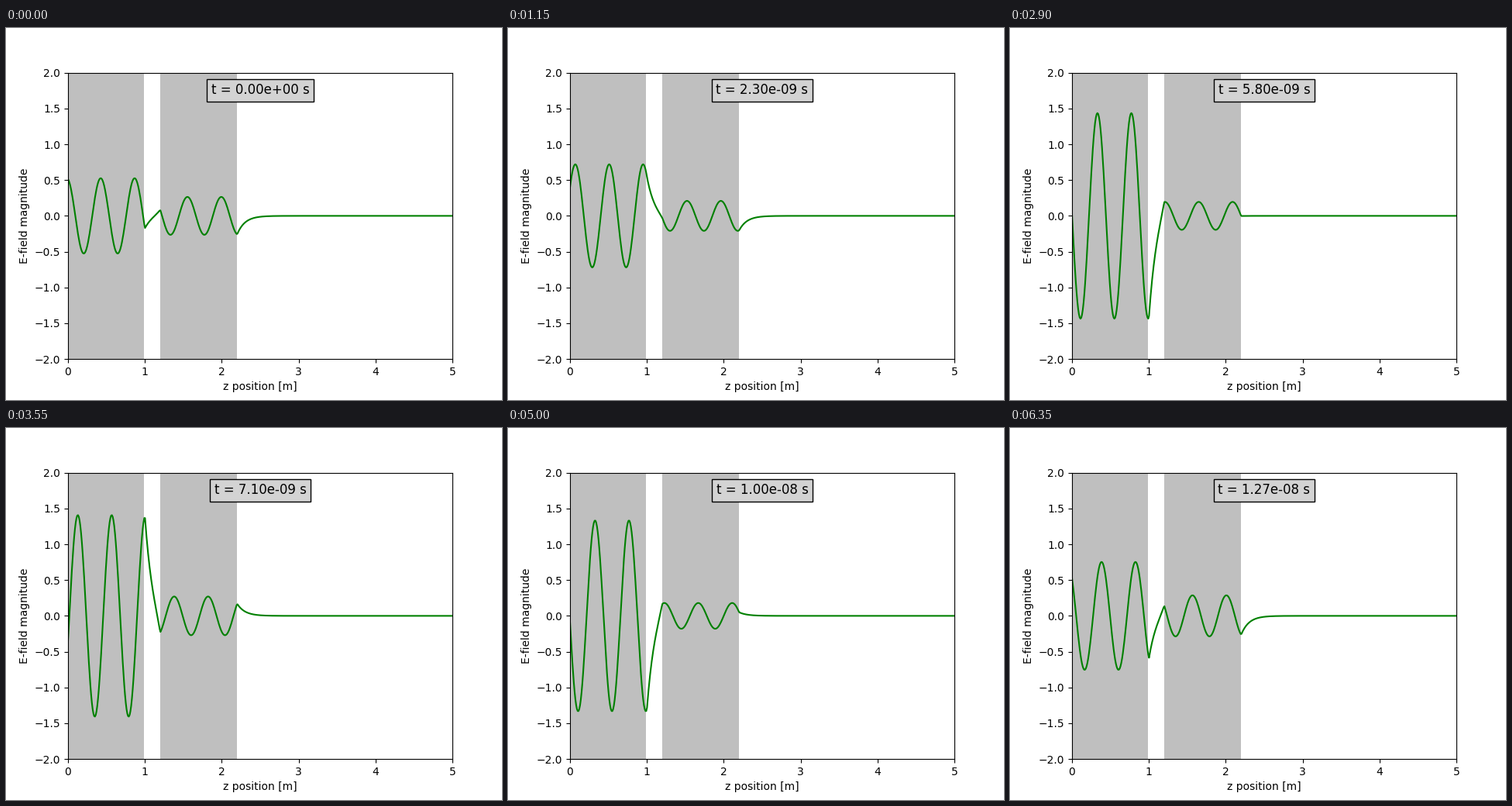
A matplotlib script that plays this animation: 640 px wide and 480 px high, repeating every 6400 ms.

```python
import numpy as np
import matplotlib.pyplot as plt
from matplotlib.animation import FuncAnimation

FRAMES, INTERVAL = 128, 50
DT = 1e-10                          # simulated seconds per frame
OMEGA = 2 * np.pi * 3e8 / 0.64      # angular frequency [rad/s]
K = 14.253                          # z wavenumber inside the slabs [1/m]
KAPPA = 10.0                        # evanescent decay constant [1/m]
Z1, Z2, Z3 = 1.0, 1.2, 2.2          # interfaces: slab | gap | slab | air

z = np.linspace(0, 5, 500)
slab1 = z < Z1
slab2 = (z >= Z2) & (z <= Z3)


def first_slab(z, phase):
    """Incident wave plus its reflection at Z1."""
    return np.cos(K * z - phase) + 0.5 * np.cos(K * (z - 2 * Z1) + phase)


def second_slab(z, phase):
    """Two counter-propagating waves of unequal strength."""
    u, p = K * (z - 1.579), phase + 0.571
    return 0.2345 * np.cos(u + p) + 0.0595 * np.cos(u - p)


def gap(z, left, right):
    """Evanescent field joining the values at both gap edges."""
    return (left * np.sinh(KAPPA * (Z2 - z))
            + right * np.sinh(KAPPA * (z - Z1))) / np.sinh(KAPPA * (Z2 - Z1))


def field(t):
    phase = OMEGA * t
    left = first_slab(Z1, phase)
    right = second_slab(Z2, phase)
    tail = second_slab(Z3, phase) * np.exp(-KAPPA * (z - Z3))
    return np.select(
        [slab1, z < Z2, slab2],
        [first_slab(z, phase), gap(z, left, right), second_slab(z, phase)],
        tail)


fig, ax = plt.subplots(figsize=(6.4, 4.8), dpi=100)
ax.set_xlim(0, 5)
ax.set_ylim(-2, 2)
ax.set_xlabel("z position [m]")
ax.set_ylabel("E-field magnitude")
for region in (slab1, slab2):
    ax.fill_between(z, -2, 2, where=region, color="gray", alpha=0.5,
                    linewidth=0)

line, = ax.plot(z, field(0), color="green", lw=1.5)
label = ax.text(2.5, 1.7, "", fontsize=12, ha="center",
                bbox={"facecolor": "lightgray"})


def update(i):
    t = i * DT
    line.set_ydata(field(t))
    label.set_text(f"t = {t:.2e} s")
    return line, label


anim = FuncAnimation(fig, update, frames=FRAMES, interval=INTERVAL,
                     repeat=True, repeat_delay=0)
plt.show()
```
